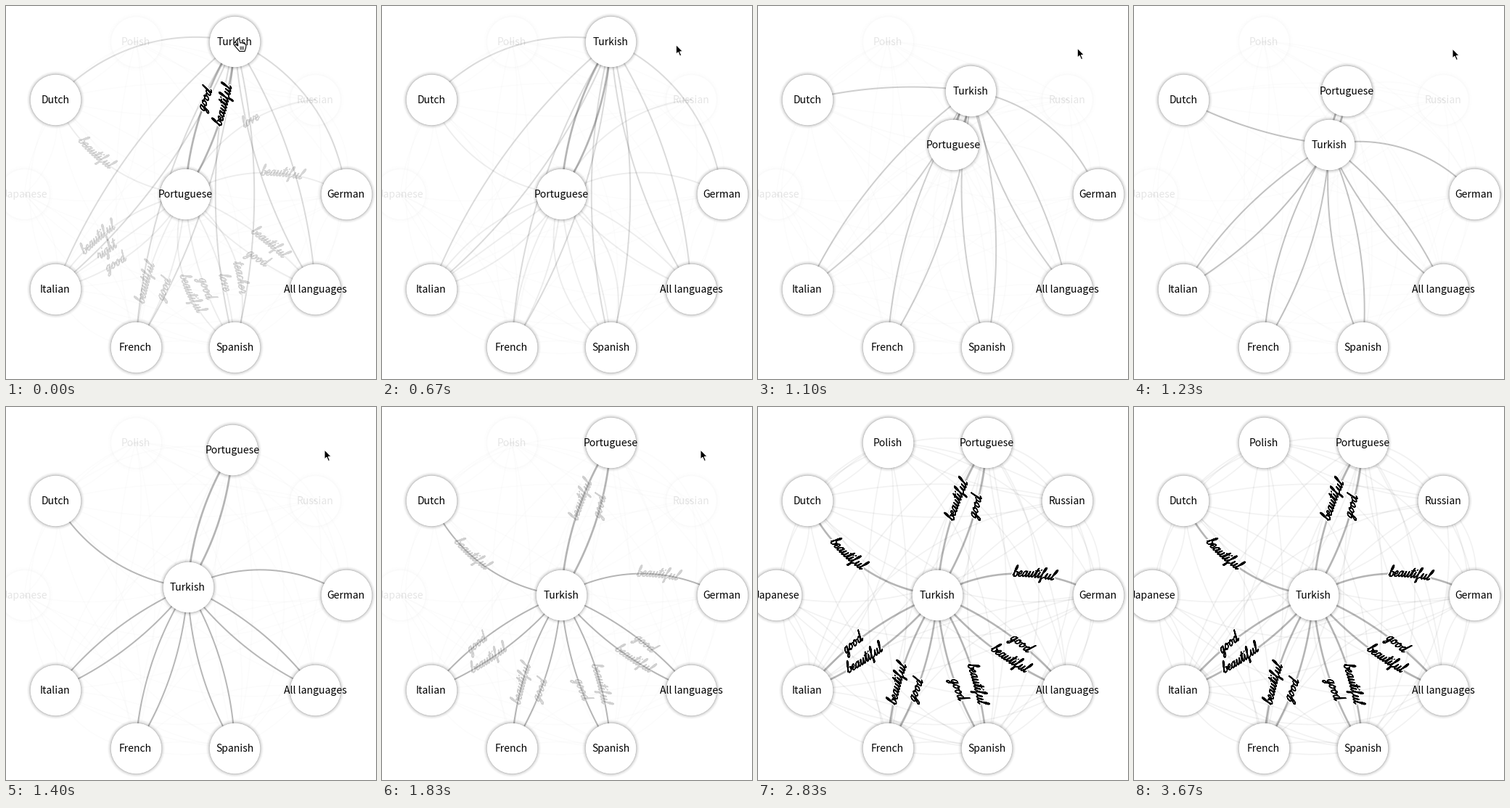
Recreate the animation shown at these times as a matplotlib script. Size 510 by 514 pixels, loop 3.71 s.

```python
import itertools
import random

import numpy as np
import matplotlib.pyplot as plt
from matplotlib.animation import FuncAnimation
from matplotlib.collections import LineCollection
from matplotlib.patches import Polygon

W, H, DPI = 510, 514, 128
STEP, FRAMES = 35, 106
PX = 72 / DPI  # points per pixel
HUB = np.array([247.0, 259.3])
RING = 221.6
SINGLE, DOUBLE, TRIPLE, WIDE = 0.134, 0.0635, 0.1, 0.17

random.seed(4)
fig = plt.figure(figsize=(W / DPI, H / DPI), dpi=DPI, facecolor="white")
ax = fig.add_axes([0, 0, 1, 1])
ax.set_xlim(0, W)
ax.set_ylim(H, 0)
ax.axis("off")


def on_ring(step):
    a = np.radians(36 * step)
    return HUB + RING * np.array([np.cos(a), np.sin(a)])


TOP = on_ring(-2)
LINKED = {"German": 0, "All languages": 1, "Spanish": 2, "French": 3,
          "Italian": 4, "Dutch": 6}
DIMMED = {"Japanese": 5, "Polish": 7, "Russian": 9}
place = {name: on_ring(k) for name, k in {**LINKED, **DIMMED}.items()}


def cubic(u):
    u = np.clip(u, 0, 1)
    return 4 * u ** 3 if u < 0.5 else 1 - 4 * (1 - u) ** 3


def ramp(t, start, end):
    return float(np.clip((t - start) / (end - start), 0, 1))


def arc(a, b, bow, t):
    """Points at fractions t of a circular arc; bow is sagitta over chord."""
    t = np.asarray(t)[:, None]
    d = b - a
    length = max(np.hypot(*d), 1e-6)
    side = 1 if bow >= 0 else -1
    s = max(abs(bow), 1e-3)
    radius = length * (s * s + 0.25) / (2 * s)
    rise = np.sqrt(radius ** 2 - (length * (t - 0.5)) ** 2) - radius + s * length
    return a + t * d + side * rise * np.array([-d[1], d[0]]) / length


# ---- brush lettering -------------------------------------------------
def tail(x):
    return [(x, 1.5), (x + 1, 0), (x + 2.6, 2)]


BOWL = [(4.6, 6), (3, 7), (1, 5), (0.7, 1.5), (2, 0), (4, 2.5)]
LOOP = [(0, 2), (2.8, 9), (3.2, 13), (2.2, 14), (1.3, 10)]
GLYPHS = {
    "a": BOWL + [(5, 7)] + tail(4.8),
    "b": LOOP + [(1.2, 2), (2.5, 0), (5, 1.5), (5, 5), (3.8, 6), (6.5, 5)],
    "c": [(4.2, 6), (2.5, 7), (0.8, 4.5), (1, 1), (2.5, 0), (5.5, 2)],
    "d": BOWL + [(5.6, 14)] + tail(5),
    "e": [(0, 2.5), (3.5, 4), (3.5, 6.5), (2, 6.8), (0.8, 4), (1.5, 0.5),
          (3.5, 0.3), (5.5, 2.5)],
    "f": LOOP + [(1.8, -2), (1.5, -5.5), (2.8, -5), (2.8, -0.5), (6, 2)],
    "g": BOWL + [(5, 7), (4.3, -3), (2.5, -6), (1, -4.5), (3, -1.5), (7, 2)],
    "h": LOOP + [(0.8, 0), (2.2, 5.5), (3.8, 6.5)] + tail(4.2),
    "i": [(0, 2), (1.4, 7)] + tail(1.2),
    "l": LOOP + tail(1.2),
    "o": [(3, 7), (1, 5), (0.7, 1.5), (2.2, 0), (4.5, 2), (4.8, 5), (3, 7),
          (4, 5), (7, 5.5)],
    "r": [(0, 3), (1.5, 8), (2, 6.5), (4, 6.5)] + tail(3.6),
    "t": [(0, 2), (2.5, 12)] + tail(1.8),
    "u": [(0, 3), (1.2, 7), (1, 1.5), (2.2, 0), (4, 2.5), (5, 7)] + tail(4.8),
    "v": [(0, 4), (1.2, 7), (1.8, 0), (4, 4), (4.4, 7), (6.5, 6)],
}
MARKS = {"t": [(0, 8.5), (4.5, 9)], "i": [(2, 10), (2.2, 10.6)]}
GAP = np.full((1, 2), np.nan)


def smooth(points, n=6):
    """Catmull-Rom curve through the points."""
    p = np.array([points[0], *points, points[-1]], float)
    u = np.linspace(0, 1, n, endpoint=False)[:, None]
    parts = []
    for a, b, c, d in zip(p, p[1:], p[2:], p[3:]):
        parts.append(0.5 * (2 * b + (c - a) * u
                            + (2 * a - 5 * b + 4 * c - d) * u ** 2
                            + (3 * b - a - 3 * c + d) * u ** 3))
    return np.vstack(parts + [p[-1:]])


def lettering(word, scale=1.08):
    """Slanted pen strokes of a word, centred on the origin."""
    x, strokes = 0, []
    for ch in word:
        lines = [smooth(GLYPHS[ch])]
        if ch in MARKS:
            lines.append(np.array(MARKS[ch], float))
        for line in lines:
            strokes += [line + (x, 0), GAP]
        x += GLYPHS[ch][-1][0]
    pts = np.vstack(strokes)
    pts[:, 0] += 0.3 * pts[:, 1] - x / 2 - 1
    pts = pts * scale - (0, 3.8)
    return np.vstack([pts + (k, k / 2) for k in (-0.4, 0, 0.4)])


class Label:
    """A word written along an edge."""

    def __init__(self, word, a, b, bow, at, strength):
        self.strength = strength
        pts = lettering(word)
        d = b - a
        flow = 1 if d[0] >= 0 else -1
        t = at + flow * pts[:, 0] / np.hypot(*d)
        base = arc(a, b, bow, t)
        tangent = arc(a, b, bow, t + 0.005 * flow) - base
        tangent /= np.hypot(*tangent.T)[:, None]
        up = np.column_stack([tangent[:, 1], -tangent[:, 0]])
        xy = base + up * pts[:, 1:]
        style = dict(solid_capstyle="round", solid_joinstyle="round")
        self.halo, = ax.plot(*xy.T, color="white", lw=4 * PX, zorder=3, **style)
        self.ink, = ax.plot(*xy.T, color="black", lw=1.15 * PX, zorder=4, **style)

    def fade(self, k):
        for line in (self.halo, self.ink):
            line.set_alpha(self.strength * k)
            line.set_visible(k > 0)


# ---- edges: target, bow before, bow after, word ----------------------
TURKISH = [
    ("Portuguese", DOUBLE, DOUBLE, "good"),
    ("Portuguese", -DOUBLE, -DOUBLE, "beautiful"),
    ("Dutch", SINGLE, -SINGLE, "beautiful"),
    ("German", -SINGLE, -SINGLE, "beautiful"),
    ("Italian", DOUBLE, DOUBLE, "good"),
    ("Italian", -DOUBLE, -DOUBLE, "beautiful"),
    ("French", DOUBLE, DOUBLE, "beautiful"),
    ("French", -DOUBLE, -DOUBLE, "good"),
    ("Spanish", DOUBLE, DOUBLE, "good"),
    ("Spanish", -DOUBLE, -DOUBLE, "beautiful"),
    ("All languages", DOUBLE, DOUBLE, "beautiful"),
    ("All languages", -DOUBLE, -DOUBLE, "good"),
]
PORTUGUESE = [
    ("Dutch", -SINGLE, SINGLE, "beautiful"),
    ("German", -SINGLE, -SINGLE, "beautiful"),
    ("Russian", -SINGLE, -SINGLE, "love"),
    ("Italian", TRIPLE, TRIPLE, "beautiful"),
    ("Italian", 0, 0, "right"),
    ("Italian", -TRIPLE, -TRIPLE, "good"),
    ("French", DOUBLE, DOUBLE, "beautiful"),
    ("French", -DOUBLE, -DOUBLE, "good"),
    ("Spanish", WIDE, WIDE, "beautiful"),
    ("Spanish", DOUBLE, DOUBLE, "good"),
    ("Spanish", -DOUBLE, -DOUBLE, "love"),
    ("Spanish", -WIDE, -WIDE, "teacher"),
    ("All languages", -DOUBLE, -DOUBLE, "beautiful"),
    ("All languages", DOUBLE, DOUBLE, "good"),
]
SPAN = np.linspace(0, 1, 30)


def new_line():
    return ax.plot([], [], color="black", zorder=2)[0]


turkish_lines = [new_line() for _ in TURKISH]
portuguese_lines = [new_line() for _ in PORTUGUESE]

mesh_paths = []
for p, q in itertools.combinations(place.values(), 2):
    for bow in random.choice([(SINGLE,), (-SINGLE,), (DOUBLE, -DOUBLE)]):
        mesh_paths.append(arc(p, q, bow, SPAN))
mesh = LineCollection(mesh_paths, colors="black", linewidths=1.7 * PX, zorder=1)
ax.add_collection(mesh)

old_labels = [Label(word, HUB, place[to], bow, 0.6, 0.16)
              for to, bow, _, word in PORTUGUESE]
old_labels += [Label(word, TOP, HUB, bow, 0.4, 1)
               for to, bow, _, word in TURKISH if to == "Portuguese"]
new_labels = [Label(word, HUB, place.get(to, TOP), bow, 0.6, 1)
              for to, _, bow, word in TURKISH]


# ---- nodes -----------------------------------------------------------
class Nodes:
    """A group of discs sharing one opacity."""
    GLOW = (0.2, 0.13, 0.08, 0.045, 0.02)

    def __init__(self, names, spots, z):
        xy = np.array(spots)
        self.rings = [ax.plot(*xy.T, "o", mfc="none", mec="black", mew=1.2 * PX,
                              ms=2 * (35 + i) * PX, zorder=z)[0]
                      for i in range(len(self.GLOW))]
        self.face, = ax.plot(*xy.T, "o", color="white", mew=0,
                             ms=69.4 * PX, zorder=z + 0.1)
        self.texts = [ax.text(x, y + 5, name, fontsize=14 * PX, ha="center",
                              va="baseline", family="Noto Sans CJK JP",
                              zorder=z + 0.2)
                      for name, (x, y) in zip(names, spots)]
        self.fade(1)

    def fade(self, k):
        for ring, glow in zip(self.rings, self.GLOW):
            ring.set_alpha(glow * k)
        for part in [self.face, *self.texts]:
            part.set_alpha(k)

    def move(self, spot):
        for part in [*self.rings, self.face]:
            part.set_data([spot[0]], [spot[1]])
        self.texts[0].set_position((spot[0], spot[1] + 5))


Nodes(LINKED, [place[n] for n in LINKED], 5)
dimmed = Nodes(DIMMED, [place[n] for n in DIMMED], 5)
portuguese = Nodes(["Portuguese"], [HUB], 6)
turkish = Nodes(["Turkish"], [TOP], 7)

# ---- pointer ---------------------------------------------------------
HAND = np.array([(0, 0), (2, 0), (3, 1.5), (3.8, 6), (6, 5.5), (8, 6.5), (10, 7),
                 (12, 9), (11.5, 13), (10, 17.5), (3, 17.5), (-1, 13),
                 (-4, 9.5), (-2.5, 8), (0.8, 10)])
KNUCKLES = np.vstack([[(x, 11), (x + 0.3, 15), (np.nan, np.nan)]
                      for x in (4, 6, 8)])
ARROW = np.array([(0, 0), (0, 13), (3, 10.2), (5.2, 15.5), (7.4, 14.6),
                  (5.2, 9.5), (9.2, 9.3)])
hand = ax.add_patch(Polygon(HAND, fc="white", ec="black", lw=1.1 * PX, zorder=9))
knuckles, = ax.plot([], [], color="black", lw=0.9 * PX, zorder=9.1)
arrow = ax.add_patch(Polygon(ARROW, fc="black", ec="white", lw=1 * PX, zorder=9))


def draw_pointer(t):
    times = [500, 760, 930, 1230, 2570, 2600, 2680]
    spot = np.array([np.interp(t, times, [319, 442, 442, 439, 439, 478, 530]),
                     np.interp(t, times, [45, 57, 57, 59, 59, 48, 20])])
    pointing = spot[0] < 350
    hand.set_xy(HAND + spot)
    knuckles.set_data(*(KNUCKLES + spot).T)
    arrow.set_xy(ARROW + spot)
    hand.set_visible(pointing)
    knuckles.set_visible(pointing)
    arrow.set_visible(not pointing)


def bend(line, a, b, bow, alpha, width):
    line.set_data(*arc(a, b, bow, SPAN).T)
    line.set_alpha(alpha)
    line.set_linewidth(width * PX)


def draw(i):
    t = i * STEP + STEP / 2
    swap = cubic(np.interp(t, [660, 930, 1230, 1400, 1660],
                           [0, 0.272, 0.552, 0.748, 1]))
    reveal = ramp(t, 2480, 2780)

    spots = dict(place)
    spots["Turkish"] = tk = TOP + (HUB - TOP) * swap
    spots["Portuguese"] = pt = HUB + (TOP - HUB) * swap
    turkish.move(tk)
    portuguese.move(pt)
    dimmed.fade(0.1 + 0.9 * reveal)

    for line, (to, before, after, _) in zip(turkish_lines, TURKISH):
        strong = to == "Portuguese"
        alpha = 0.29 if strong else 0.14 + 0.15 * swap
        width = 2.7 if strong else 2 + 0.6 * reveal
        bend(line, tk, spots[to], before + (after - before) * swap, alpha, width)

    faint = 0.012 + 0.06 * (1 - swap) ** 8 + 0.038 * reveal
    for line, (to, before, after, _) in zip(portuguese_lines, PORTUGUESE):
        bend(line, pt, spots[to], before + (after - before) * swap, faint, 1.9)
    mesh.set_alpha(0.01 + 0.04 * reveal)

    for label in old_labels:
        label.fade(1 - ramp(t, 30, 330))
    for label in new_labels:
        label.fade(cubic(ramp(t, 1660, 2160)))
    draw_pointer(t)
    return []


anim = FuncAnimation(fig, draw, frames=FRAMES, interval=STEP,
                     init_func=lambda: draw(0), repeat=True, repeat_delay=0)
plt.show()
```
